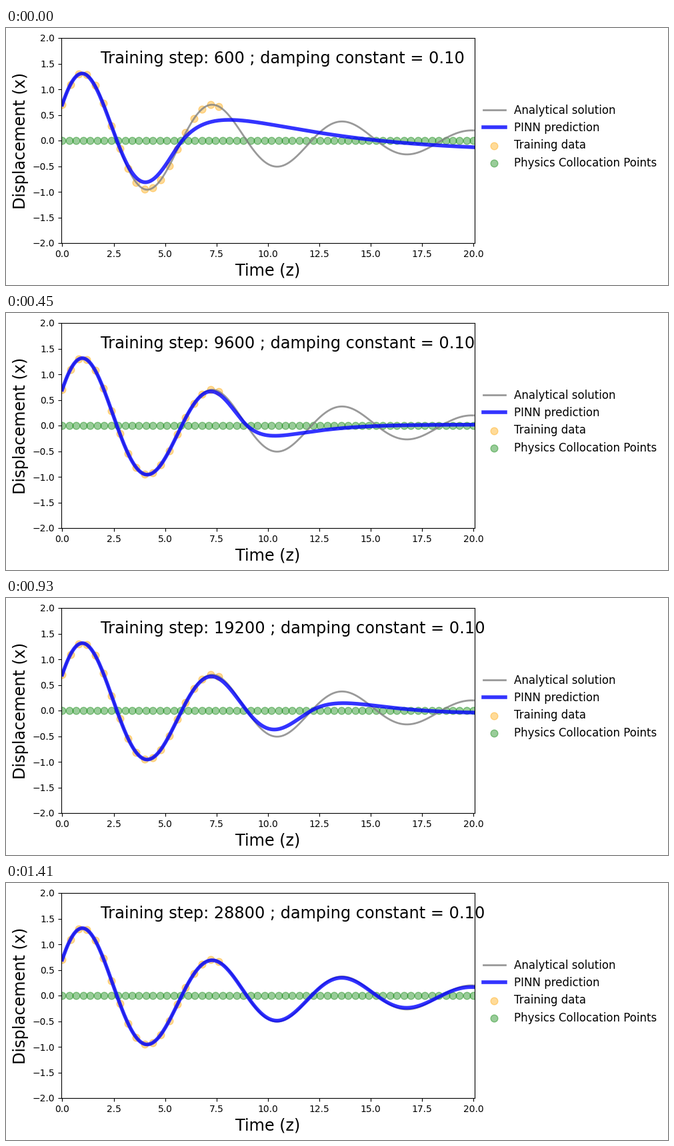
A matplotlib script for the animation above (1440 ms loop, 993 by 386 pixels).

```python
import numpy as np
import matplotlib.pyplot as plt
from matplotlib.animation import FuncAnimation

W, H, DPI = 993, 386, 100
FRAMES, INTERVAL = 48, 30
DAMPING, X0, V0 = 0.1, 0.7, 1.2

plt.rcParams["font.family"] = "DejaVu Sans"


def exact(z):
    """Damped oscillator with unit natural frequency."""
    w = np.sqrt(1 - DAMPING**2)
    b = (V0 + DAMPING * X0) / w
    return np.exp(-DAMPING * z) * (X0 * np.cos(w * z) + b * np.sin(w * z))


# Key points of the training, eased linearly in between
KEYS = [0, 9, 15, 26, 40, 47]
FRONT = [5.5, 6.2, 8.7, 11.5, 13, 20]     # time up to which the phase is learned
STRETCH = [1.9, 1.4, 2.5, 4, 2, 2]        # how slowly the phase drifts beyond it
REACH = [8.16, 8.9, 9.75, 11.9, 13.3, 38]  # time at which the amplitude is halved
STEEP = [2.5, 6, 10, 5.5, 5.5, 2.5]       # sharpness of that fall


def prediction(z, n):
    """Exact wave whose phase slows and amplitude fades past what is learned."""
    front, stretch, reach, steep = (
        np.interp(n, KEYS, v) for v in (FRONT, STRETCH, REACH, STEEP))
    beyond = np.maximum(z - front, 0)
    slow = np.minimum(z, front) + stretch * np.log1p(beyond / stretch)
    return exact(slow) / (1 + (slow / reach) ** steep)


fig = plt.figure(figsize=(W / DPI, H / DPI), dpi=DPI, facecolor="white")
ax = fig.add_axes([82.87 / W, 63 / H, 620 / W, 308 / H])

z = np.linspace(0, 20, 500)
ax.plot(z, exact(z), color="grey", linewidth=2, alpha=0.8,
        label="Analytical solution")
line, = ax.plot(z, prediction(z, 0), color="blue", linewidth=4, alpha=0.8,
                label="PINN prediction")
data_z = np.arange(20) * 0.4
ax.scatter(data_z, exact(data_z), s=60, color="orange", alpha=0.4,
           label="Training data")
points = np.linspace(0, 20, 60)
ax.scatter(points, 0 * points, s=60, color="green", alpha=0.4,
           label="Physics Collocation Points")

ax.set_xlim(-0.05, 20.05)
ax.set_ylim(-2, 2)
ax.set_xlabel("Time (z)", fontsize="xx-large")
ax.set_ylabel("Displacement (x)", fontsize="xx-large")
ax.legend(loc=(1.01, 0.34), frameon=False, fontsize="large")
title = ax.text(1.87, 1.5, "", fontsize="xx-large", color="black")


def update(n):
    line.set_ydata(prediction(z, n))
    title.set_text(f"Training step: {600 * (n + 1)} ; "
                   f"damping constant = {DAMPING:.2f}")
    return line, title


anim = FuncAnimation(fig, update, frames=FRAMES, interval=INTERVAL,
                     repeat=True, repeat_delay=0, blit=False)
plt.show()
```
